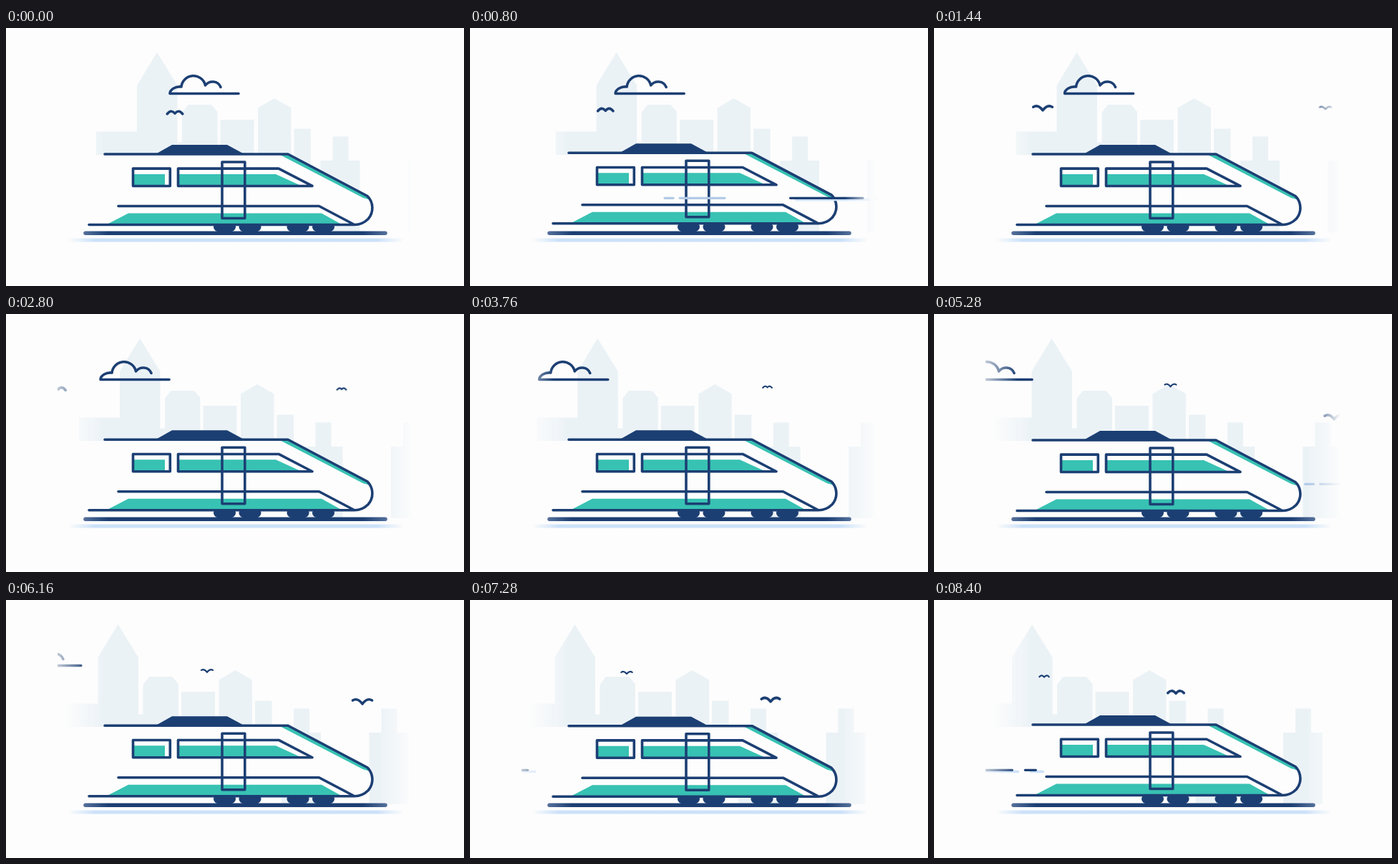
An HTML page for the animation above (8480 ms loop, 640 by 360 pixels).

```html
<!DOCTYPE html>
<html lang="en">
<head>
<meta charset="utf-8">
<title>Train ride</title>
<style>
  html, body { margin: 0; width: 100%; height: 100%; overflow: hidden; background: #fdfdfd; }
  svg { display: block; width: 100vw; height: 100vh; }
  .line { fill: none; stroke: #1c3f73; stroke-width: 3.6; stroke-linecap: round; stroke-linejoin: round; }
  .navy { fill: #1c3f73; }
  .teal { fill: #38c2b3; }
  .city { fill: #ebf2f6; }
  .paper { fill: #fdfdfd; }
</style>
</head>
<body>
<svg viewBox="0 0 640 360">
  <defs>
    <linearGradient id="cityFade" gradientUnits="userSpaceOnUse" x1="82" x2="570" y1="0" y2="0">
      <stop offset="0" stop-color="#000"/><stop offset=".11" stop-color="#fff"/>
      <stop offset=".9" stop-color="#fff"/><stop offset="1" stop-color="#000"/>
    </linearGradient>
    <linearGradient id="skyFade" gradientUnits="userSpaceOnUse" x1="72" x2="568" y1="0" y2="0">
      <stop offset="0" stop-color="#444"/><stop offset=".09" stop-color="#fff"/>
      <stop offset=".91" stop-color="#fff"/><stop offset="1" stop-color="#000"/>
    </linearGradient>
    <linearGradient id="rail" gradientUnits="userSpaceOnUse" x1="108" x2="533" y1="0" y2="0">
      <stop offset="0" stop-color="#55719b"/><stop offset=".08" stop-color="#1c3f73"/>
      <stop offset=".92" stop-color="#1c3f73"/><stop offset="1" stop-color="#55719b"/>
    </linearGradient>
    <linearGradient id="glow" gradientUnits="userSpaceOnUse" x1="86" x2="556" y1="0" y2="0">
      <stop offset="0" stop-color="#cce1f9" stop-opacity="0"/><stop offset=".08" stop-color="#cce1f9"/>
      <stop offset=".92" stop-color="#cce1f9"/><stop offset="1" stop-color="#cce1f9" stop-opacity="0"/>
    </linearGradient>
    <mask id="cityMask" maskUnits="userSpaceOnUse" x="0" y="0" width="640" height="360">
      <rect x="82" width="488" height="360" fill="url(#cityFade)"/>
    </mask>
    <mask id="skyMask" maskUnits="userSpaceOnUse" x="0" y="0" width="640" height="360">
      <rect x="72" width="496" height="360" fill="url(#skyFade)"/>
    </mask>
    <path id="tower" d="M439.500 285V185H456.500V151.500H478.500V185H494.500V285Z"/>
  </defs>

  <g mask="url(#cityMask)">
    <g id="city" class="city">
      <path d="M126 177V144.500H183V80L211 34L239.500 80V159.500H246V118L254.500 107H287L295.500 117V177Z"/>
      <path d="M299.500 177V128H346.500V177ZM352 177V111.500L375 98L398.500 111.500V177ZM402.500 190V140.500H426V190Z"/>
      <use href="#tower"/>
      <use href="#tower" x="122.500"/>
    </g>
  </g>

  <g mask="url(#skyMask)">
    <path id="cloud" class="line" d="M325 91.500H229C229 86 237 81 245 82A17 17 0 0 1 278.500 80C284 73 296 73 300 82.500"/>
    <path class="line bird"/>
    <path class="line bird" stroke-width="2.300"/>
    <path class="line bird"/>
  </g>

  <g class="navy">
    <ellipse cx="305.500" cy="277.500" rx="15.500" ry="9"/>
    <ellipse cx="341" cy="277.500" rx="15.500" ry="9"/>
    <ellipse cx="408" cy="277.500" rx="15.500" ry="9"/>
    <ellipse cx="443.500" cy="277.500" rx="15.500" ry="9"/>
  </g>

  <g id="train">
    <path class="paper" d="M138 175.500H394L505 234C514 243 514 257 506 266C501 271 495 274 487 274H116Z"/>
    <path class="teal" d="M382 176H396L505 234L508 239L499 236.500Z"/>
    <path class="teal" d="M142 273L171 258H441L468 273Z"/>
    <path class="teal" d="M179 203.500H222V219H179ZM242 203.500H377L411 219H242Z"/>
    <path class="navy" d="M208 176L232 162.500H309L334 176Z"/>
    <path class="line" d="M138 175.500H394L505 234C514 243 514 257 506 266C501 271 495 274 487 274H116M157 248H437.500L486 273.500"/>
    <path class="line" d="M177.500 195.700H229.300V220H177.500ZM240.500 195.700H381L428 220H240.500ZM302 186.500H333.800V265H302Z"/>
  </g>

  <path d="M111 286.300H530" fill="none" stroke="url(#rail)" stroke-width="5.500" stroke-linecap="round"/>
  <rect x="86" y="293.500" width="470" height="5" fill="url(#glow)"/>

  <g mask="url(#skyMask)">
    <g id="streak" fill="none" stroke-width="3.300" stroke-linecap="round">
      <path d="M89 237.300H101M110 237.300H173" stroke="#b3cae6"/>
      <path d="M272 239.500H374M392 239.500H409" stroke="#cce1f9"/>
      <path d="M264.500 237.300H366M384 237.300H399" stroke="#1c3f73"/>
    </g>
  </g>
</svg>
<script>
const LOOP = 8480, STEP = 80;
const $ = id => document.getElementById(id);
const birds = document.querySelectorAll('.bird');

// Piecewise linear, continued past both ends.
function along(t, keys, col = 1) {
  let i = 1;
  while (i < keys.length - 1 && t > keys[i][0]) i++;
  const a = keys[i - 1], b = keys[i];
  return a[col] + (b[col] - a[col]) * (t - a[0]) / (b[0] - a[0]);
}

const travel = [[0, 0], [1440, 11.5], [2800, 24], [4560, 40], [6160, 54.5], [7280, 64.5], [8400, 74]];
const flights = [
  { size: 1, keys: [[0, 236, 118], [1440, 152, 111]] },
  { size: .6, keys: [[1440, 547, 111], [2800, 469, 104.5], [4560, 371, 99.5], [6160, 281, 98.5], [7280, 219, 101], [8400, 154, 106.5]] },
  { size: 1, keys: [[6160, 498, 141], [7280, 420, 138.5], [8400, 338, 128.5]] }
];

const move = (el, x, y = 0) => el.setAttribute('transform', `translate(${x} ${y})`);

function drawBird(el, { size, keys }, t) {
  const flap = Math.cos(2 * Math.PI * (t / 960 + .08));
  const w = 12 - 1.5 * flap, tip = .5 + 1.5 * flap, dip = 2.5 - 1.5 * flap;
  el.setAttribute('d', `M${-w} ${tip}Q${-w / 2} -5 0 ${dip}Q${w / 2} -5 ${w} ${tip}`);
  el.setAttribute('transform', `translate(${along(t, keys)} ${along(t, keys, 2)}) scale(${size})`);
}

function draw(t) {
  const s = along(t, travel);
  move($('city'), -s);
  move($('cloud'), -4.04 * s);
  flights.forEach((f, i) => drawBird(birds[i], f, t));
  move($('train'), 0, -.5 - Math.cos(2 * Math.PI * (t / 480 - .54)));

  const period = 1187, lead = 550;
  const pass = (t - 4560 + lead + 9 * period) % period - lead;
  move($('streak'), t > 200 ? -.92 * pass : 900);
}

const start = performance.now();
function tick() {
  const t = (performance.now() - start) % LOOP;
  draw(Math.floor(t / STEP) * STEP);
  requestAnimationFrame(tick);
}
tick();
</script>
</body>
</html>
```
